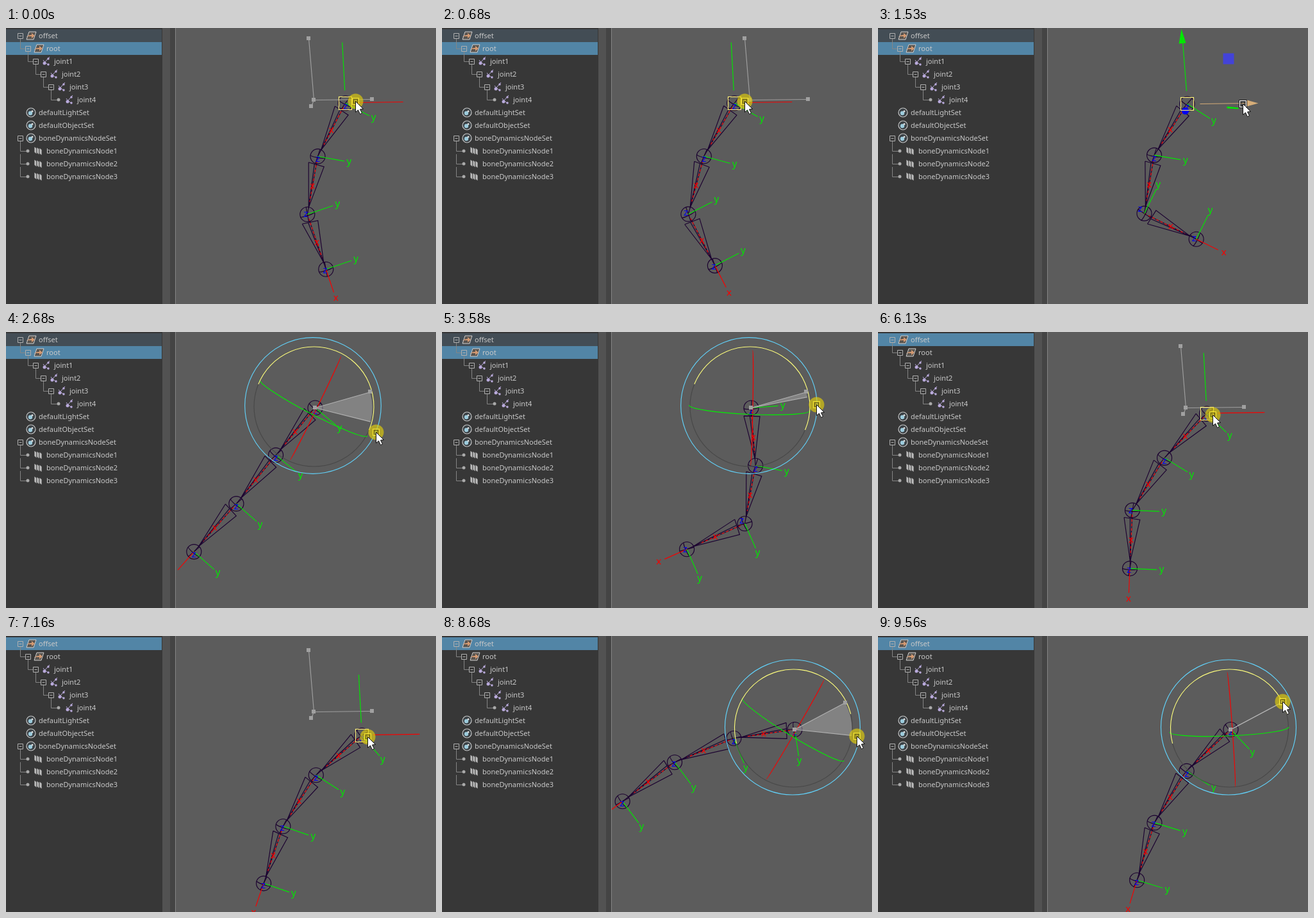
These frames come from a looping animation (671 by 431 pixels, 9630 ms). An HTML page with a canvas:

```html
<!DOCTYPE html>
<html lang="en">
<head>
<meta charset="utf-8">
<title>Bone dynamics rig</title>
<style>
html, body { margin: 0; width: 671px; height: 431px; overflow: hidden; background: #5c5c5c; }
svg, canvas { position: absolute; left: 0; top: 0; display: block; }
text { font: 11px "Noto Sans", "Open Sans", sans-serif; fill: #c8c8c8; }
.link, .box { fill: none; stroke: #858585; }
.box { stroke: #b0b0b0; }
.dot { fill: #aaa; }
.row { fill: none; }
.row.sel { fill: #5285a6; }
.row.parent { fill: #434d55; }
</style>
</head>
<body>
<svg id="panel" width="265" height="431" viewBox="0 0 265 431">
  <defs>
    <g id="xform">
      <path d="M-3-6H8L4 6H-7Z" fill="#5a5550" stroke="#d0d0d0"/>
      <path d="M-7 2C-4-1-2-1 1-1V-4L6 0 1 4V1H-7Z" fill="#d59a72"/>
    </g>
    <g id="joint" fill="#b9aadb">
      <path d="M5-7L-2 1M-5-2L-2 2M-1 2L3 6" stroke="#b9aadb" fill="none"/>
      <circle cx="-3" cy="3" r="2.500"/><circle cx="3" cy="-4" r="1.700"/><circle cx="3" cy="5" r="1.700"/>
    </g>
    <g id="set">
      <circle r="7" fill="#3b4145" stroke="#c8c8c8" stroke-width="1.200"/>
      <circle cx="-1" cy="1" r="3.200" fill="#9ccbdc"/><circle cx="2" cy="-2" r="1.500" fill="#ddd"/>
    </g>
    <g id="node" fill="#bdbdbd" stroke="#333" stroke-width=".8">
      <path id="slat" d="M-7-7L-3-4V5L-7 2Z"/><use href="#slat" x="4" y="1"/><use href="#slat" x="8" y="2"/>
    </g>
  </defs>
  <rect width="244" height="431" fill="#373737"/>
  <rect x="244" width="12" height="431" fill="#525252"/>
  <rect x="256" width="8" height="431" fill="#444"/>
  <rect x="264" width="1" height="431" fill="#858585"/>
  <rect class="row" id="row0" y="2" width="243" height="20"/>
  <rect class="row" id="row1" y="22" width="243" height="20"/>
  <g id="tree"></g>
</svg>
<canvas id="view" width="671" height="431"></canvas>
<script>
const LOOP = 9630, RAD = Math.PI / 180, TAU = 2 * Math.PI;
const g = document.getElementById('view').getContext('2d');
const row0 = document.getElementById('row0'), row1 = document.getElementById('row1');

// Outliner: name, depth, icon, has children
const items = [
  ['offset', 0, 'xform', true], ['root', 1, 'xform', true],
  ...[1, 2, 3, 4].map(n => ['joint' + n, n + 1, 'joint', n < 4]),
  ['defaultLightSet', 0, 'set'], ['defaultObjectSet', 0, 'set'], ['boneDynamicsNodeSet', 0, 'set', true],
  ...[1, 2, 3].map(n => ['boneDynamicsNode' + n, 1, 'node'])
];
document.getElementById('tree').innerHTML = items.map(([name, depth, icon, open], i) => {
  const x = 51 + 12 * depth, y = 12 + 20 * i, b = x - 28.5;
  let s = '';
  if (depth) s += `<path class="link" d="M${b - 12} ${y - 15}V${y + .5}H${b - (open ? 4 : 0)}"/>`;
  if (depth && !open) s += `<circle class="dot" cx="${b - .5}" cy="${y}" r="2.500"/>`;
  if (open) s += `<path class="box" fill="#373737" d="M${b - 4} ${y - 3.5}h8v8h-8zM${b - 2} ${y + .5}h4"/>`;
  return s + `<use href="#${icon}" x="${x - 12}" y="${y}"/><text x="${x}" y="${y + 4}">${name}</text>`;
}).join('');

// Motion
const span = (t, from, to) => Math.min(1, Math.max(0, (t - from) / (to - from)));
const ease = u => u * u * (3 - 2 * u);

function rootAt(t) {
  if (t < 1250) return [495 + 53 * Math.sin(.695 + TAU * t / 900), 117];
  const u = span(t, 5600, 7290), s = ease(u), wave = Math.sin(1.5 * TAU * u);
  return [482 + 68 * s + 120 * (1 - u) * wave, 118 + 27.5 * s + 15 * wave];
}
function rootTurn(t) {
  const u = span(t, 2290, 4300);
  return 38 * ease(u) + 28 * Math.sin(TAU * u);
}
const offsetTurn = t => 39 * Math.sin(TAU * ease(span(t, 8130, 9560)));

// Chain: rest angles, then time, bend of each joint and swing on the way to the next pose
const REST = [98.7, 83.7, 69.3];
const poses = [
  [0, 11, 6, -11, 45], [1530, 24, 16, -43, -25], [3580, -18, 10, 78, 20], [4830, 8, 23, -7, 0],
  [7160, 4, 3, 4, 0], [7290, 0, 0, 0, 0], [8130, 0, 0, 0, 0], [8680, 1, -2, -3, 0], [9560, 0, 1, 3, 0]
];
// Stops of the pointer between drags: time, x, y
const stops = [
  [1230, 518, 114], [1480, 569, 118], [1700, 569, 118], [2290, 583, 104], [4300, 570, 168],
  [4780, 101, 9], [4980, 101, 9], [5550, 491, 120], [7290, 559, 147], [7950, 631, 102]
];
function between(keys, t) {
  const n = Math.max(0, keys.findLastIndex(k => k[0] <= t));
  const a = keys[n], b = keys[n + 1] || a, u = a === b ? 0 : span(t, a[0], b[0]);
  return { u, from: a, values: a.map((v, i) => v + (b[i] - v) * ease(u)) };
}
// Each joint follows the turn a little later and trails behind sideways moves
function chainAngles(t) {
  const { u, from, values } = between(poses, t);
  const swing = from[4] * Math.sin(TAU * u) * Math.sin(Math.PI * u);
  const drift = rootAt(t)[0] - rootAt(t - 150)[0];
  return REST.map((a, i) => {
    const late = t - 50 * i;
    return a + values[i + 1] + rootTurn(late) + offsetTurn(late) + drift * (.15 + .05 * i) + swing * (.2 + .4 * i);
  });
}

// Drawing helpers
const polar = ([x, y], deg, r) => [x + r * Math.cos(deg * RAD), y + r * Math.sin(deg * RAD)];
function line(color, ...pts) {
  g.strokeStyle = color;
  g.beginPath();
  pts.forEach(p => g.lineTo(...p));
  g.stroke();
}
function poly(color, ...pts) {
  g.fillStyle = color;
  g.beginPath();
  pts.forEach(p => g.lineTo(...p));
  g.fill();
}
function oval(color, [x, y], rx, ry, tilt = 0, from = 0, to = 360) {
  g.strokeStyle = color;
  g.beginPath();
  g.ellipse(x, y, rx, ry, tilt * RAD, from * RAD, to * RAD);
  g.stroke();
}
function disc(color, x, y, r) {
  g.fillStyle = color;
  g.beginPath();
  g.arc(x, y, r, 0, TAU);
  g.fill();
}
function box(color, [x, y], half) {
  g.strokeStyle = color;
  g.strokeRect(Math.round(x) - half, Math.round(y) - half, half * 2, half * 2);
}
function knob([x, y]) {
  g.fillStyle = '#a0a0a0';
  g.fillRect(Math.round(x) - 3.5, Math.round(y) - 3.5, 6, 6);
}
function label(text, color, [x, y]) {
  g.font = '15px "Noto Sans", "Open Sans", sans-serif';
  g.textAlign = 'center';
  g.fillStyle = color;
  g.fillText(text, x, y + 4);
}

const BONE = '#1b0030', RED = '#f80000', GREEN = '#00e800', BLUE = '#0000f0', GHOST = '#a0a0a0';

function drawJoint(p, a) {
  oval(BONE, p, 11.5, 11.5);
  line(BONE, polar(p, a + 8, 11.5), polar(p, a + 188, 11.5));
  oval(BONE, p, 11.5, 2, a - 90, 0, 180);
}
function drawBone(p, q, a, len) {
  const mid = polar(p, a, 13), tip = polar(p, a, len - 11);
  const l = polar(mid, a + 96, 12.5), r = polar(mid, a - 84, 12.5);
  line(BONE, l, r, tip, l);
  line(BONE, polar(mid, a + 96, 3), tip);
  line(BONE, polar(p, a, 8), q);
  g.setLineDash([4, 3]);
  line(RED, p, polar(p, a, len * .78));
  g.setLineDash([]);
}
function drawRig(root, t) {
  const ang = chainAngles(t), pts = [root], len = [];
  ang.forEach((a, i) => {
    // bones pointing left come nearer to the camera
    len[i] = 90.5 + Math.max(0, -Math.cos(a * RAD)) * .045 * (675 - pts[i][0]);
    pts.push(polar(pts[i], a, len[i]));
    drawBone(pts[i], pts[i + 1], a, len[i]);
  });
  pts.forEach((p, i) => {
    const a = ang[Math.min(i, 2)];
    drawJoint(p, a);
    line(GREEN, p, polar(p, a - 90, 42));
    label('y', GREEN, polar(p, a - 90, 49.5));
    if (i === 3) line(RED, p, polar(p, a, 38));
    label('x', RED, polar(p, a, i < 3 ? len[i] * .51 : 48));
    const bend = i < 2 ? 0 : Math.abs(ang[2] - ang[1]) / (i - 1);
    label('z', BLUE, [p[0] - .09 * bend, p[1] + 5 - .16 * bend]);
  });
}

function drawMove([x, y], drag, ghost, hot) {
  if (drag) {
    const [gx, gy] = ghost;
    [[gx - 8, gy - 96], [gx + 91, gy - 1], [gx - 4, gy + 10]].forEach(e => {
      line(GHOST, ghost, e);
      knob(e);
    });
    knob(ghost);
    line(GREEN, [x - 1, y - 20], [x - 5, y - 95]);
    line(RED, [x + 17, y - 1], [x + 90, y - 2]);
  } else {
    const c = hot ? '#d6ad78' : RED;
    line(GREEN, [x - 1, y - 20], [x - 7, y - 97]);
    poly(GREEN, [x - 9, y - 117], [x - 13, y - 94], [x - 2, y - 95]);
    line(c, [x + 20, y], [x + 94, y - 1]);
    poly(c, [x + 93, y - 6], [x + 111, y - 1], [x + 93, y + 4]);
    g.fillStyle = '#4343d8';
    g.fillRect(x + 56, y - 79, 17, 17);
    poly(GREEN, [x + 62, y + 4], [x + 80, y + 6], [x + 80, y + 8], [x + 62, y + 7]);
    disc(BLUE, x - 3, y + 11, 5.5);
  }
  box('#fff27a', [x, y], 10);
}

const tile = document.createElement('canvas');
tile.width = tile.height = 2;
const tg = tile.getContext('2d');
tg.fillStyle = '#a8a8a8';
tg.fillRect(0, 0, 1, 1);
tg.fillRect(1, 1, 1, 1);
const stipple = g.createPattern(tile, 'repeat');

function drawRotate(root, drag, rot, first) {
  const [x, y] = root, c = [x - 2, y - 2], r = first ? 93.5 : 92;
  const start = first ? -158 : -195, grip = first ? -16 : -28;
  oval('#484848', c, r, r);
  oval(RED, [x + .5, y], 90, 2, 86 + rot, 180, 360);
  oval('#00f000', [x - 2.5, y], r + 1, 10, rot - 2.5, 0, 180);
  oval('#ffff80', c, r, r, 0, start, start + 181);
  const outer = first ? 106.3 : 105.5;
  oval('#62d2fa', [x - 3.5, y - 3.5], outer, outer);
  if (!drag) return;
  g.fillStyle = stipple;
  g.beginPath();
  g.moveTo(x, y);
  g.arc(x, y, 89, grip * RAD, (grip + rot) * RAD, rot < 0);
  g.fill();
  [grip, grip + rot].forEach(a => line('#b0b0b0', root, polar(root, a, 89)));
  knob(root);
  knob(polar(root, grip, 89));
}

function drawCursor(x, y, press) {
  if (press) disc('rgba(225,205,10,.66)', x, y, 12);
  if (x > 264) {
    if (!press) box('#222', [x, y], 6);
    box(press ? '#f2e230' : '#fff', [x, y], 5);
    box(press ? '#6b6010' : '#222', [x, y], 3);
  }
  g.save();
  g.translate(x, y);
  g.beginPath();
  for (const p of [[0, 0], [0, 17], [4, 13.5], [7, 20], [10, 18.5], [7, 12.5], [12, 12]]) g.lineTo(...p);
  g.closePath();
  g.fillStyle = '#fff';
  g.fill();
  g.strokeStyle = '#111';
  g.stroke();
  if (x < 244) {
    g.fillStyle = '#fff';
    g.fillRect(11, 12, 7, 11);
    g.strokeRect(11, 12, 7, 11);
    for (let i = 15; i < 22; i += 2) line('#222', [13, i], [16, i]);
  }
  g.restore();
}

function draw(t) {
  const root = rootAt(t), picked = t >= 4931;
  const rot = picked ? offsetTurn(t) : rootTurn(t);
  const move = t < 1950 || (t >= 5400 && t < 7500);
  const drag = t < 1230 || (t >= 2290 && t < 4300) || (t >= 5600 && t < 7290) || t >= 8130;

  row0.setAttribute('class', picked ? 'row sel' : 'row parent');
  row1.setAttribute('class', picked ? 'row' : 'row sel');

  g.setTransform(1, 0, 0, 1, 0, 0);
  g.clearRect(0, 0, 671, 431);
  g.translate(.5, .5);
  g.lineWidth = 1.15;
  g.save();
  g.beginPath();
  g.rect(264.5, -1, 410, 434);
  g.clip();
  drawRig(root, t);
  if (move) drawMove(root, drag, [480, picked ? 118 : 112], t > 1400 && t < 1750);
  else drawRotate(root, drag, rot, !picked);
  g.restore();

  g.lineWidth = 1;
  let cur;
  if (!drag) cur = between(stops, t).values.slice(1);
  else if (move) cur = picked ? [root[0] + 9, root[1] + 2] : [root[0] + 16, root[1] - 3];
  else cur = picked ? polar(root, rot - 28, 92 + Math.abs(rot) * .17) : polar(root, rot - 8, 102);
  drawCursor(Math.round(cur[0]), Math.round(cur[1]), drag);
}

const begin = performance.now();
function tick() {
  draw((performance.now() - begin) % LOOP);
  requestAnimationFrame(tick);
}
tick();
</script>
</body>
</html>
```
